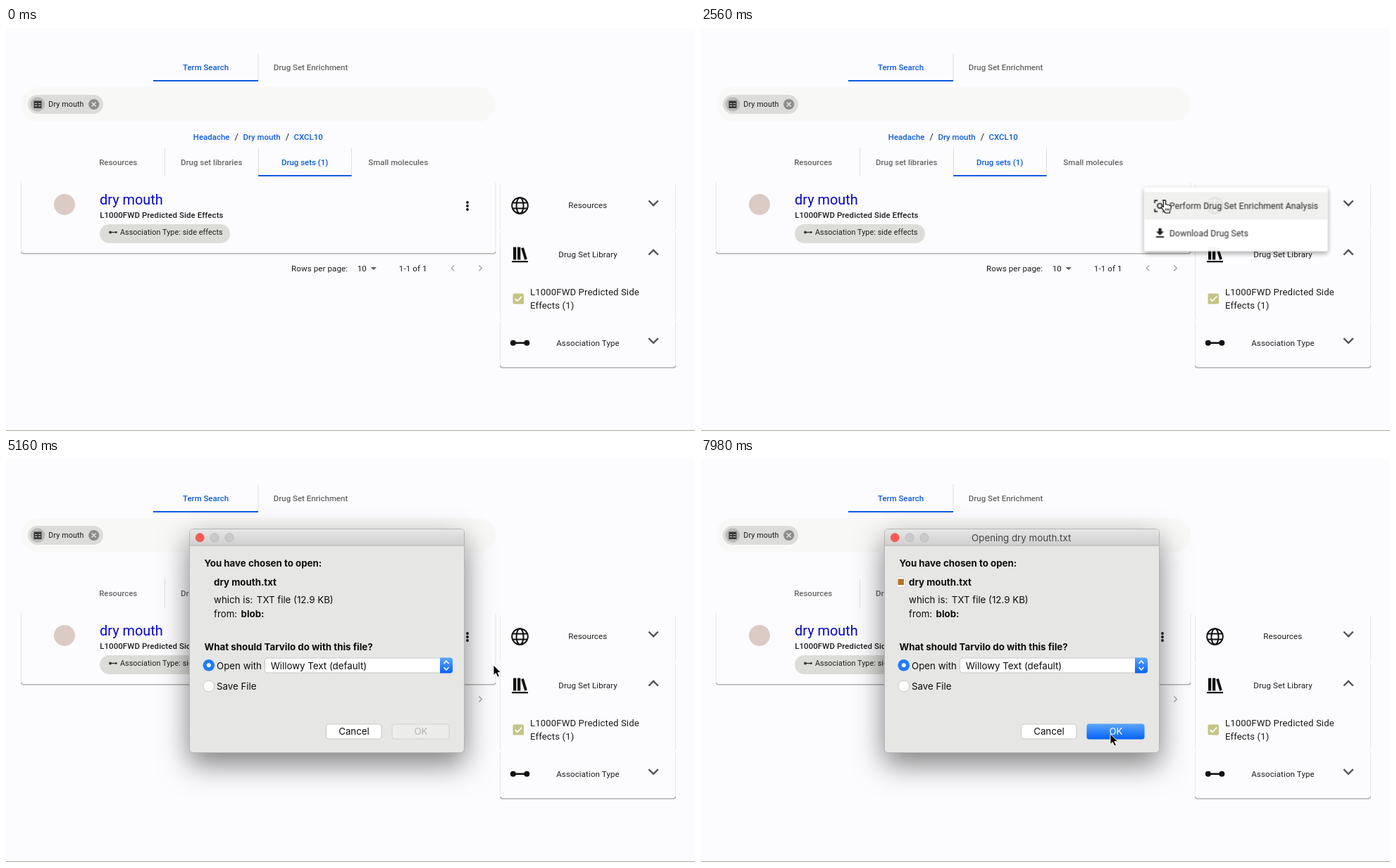
These frames come from a looping animation (978x573 px, 8 s). An HTML page:

```html
<!DOCTYPE html>
<html lang="en">
<head>
<meta charset="utf-8">
<title>Drug set search</title>
<style>
html, body { margin: 0; width: 100%; height: 100%; overflow: hidden; background: #fcfcfe; }
svg { display: block; width: 978px; height: 573px; }
text { font: 400 11.5px Roboto, Arial, sans-serif; letter-spacing: .0107em; fill: #1c1c1c; white-space: pre; }
.mid { text-anchor: middle; }
.tab { font-size: 11.46px; font-weight: 500; letter-spacing: 0; fill: #666; text-anchor: middle; }
.on { fill: #0c5ae0; }
.crumb { font-size: 11.46px; font-weight: 500; letter-spacing: 0; fill: #0c5ae0; }
.title { font-size: 19.9px; letter-spacing: 0; fill: #0505d2; }
.sub { font-size: 11.4px; font-weight: 500; }
.chip { font-size: 10.7px; }
.filter { font-size: 13.17px; letter-spacing: .0094em; }
.item { font-size: 12.36px; letter-spacing: .0094em; }
.line { fill: none; stroke: #111; stroke-width: 2; }
.rule { fill: none; stroke: #dededf; }
.edge { fill: none; stroke: #e7e7ea; }
.base { fill: none; stroke: #b0b0ae; stroke-width: 1.5; }
.chev { fill: none; stroke: #555; stroke-width: 2.4; }

#menu, #dialog, #cursor, .step { animation: 8s linear infinite; }
#menu { transform-origin: 655px 253px; animation-name: menu; }
#paper { fill: #fff; filter: drop-shadow(0 3px 4px rgba(0,0,0,.38)); }
#first { fill: #dededc; animation: first 8s linear infinite; }
#second { fill: #f5f5f4; animation: second 8s step-end infinite; }
@keyframes menu {
  0%, 30% { opacity: 0; transform: scale(.75, .5625); animation-timing-function: cubic-bezier(.4,0,.2,1); }
  32.75%, 52% { opacity: 1; transform: none; animation-timing-function: cubic-bezier(.4,0,.2,1); }
  54.5%, 100% { opacity: 0; transform: scale(.75, .5625); }
}
@keyframes first { 0%, 32% { opacity: .45; } 36%, 100% { opacity: 1; } }
@keyframes second { 0% { opacity: 0; } 43% { opacity: 1; } }

#dialog { transform-origin: 455px 258px; animation-name: dialog; }
#dialog text { font: 400 13.3px Inter, Arial, sans-serif; letter-spacing: 0; fill: #0d0d0d; }
#dialog .bold { font-weight: 700; }
#dialog .head { fill: #444; }
#dialog .off { fill: #b4b4b1; }
#dialog .lit { fill: #fff; }
#frame { filter: drop-shadow(0 16px 20px rgba(0,0,0,.5)); }
.field { fill: #fff; stroke: #c6c6c4; }
@keyframes dialog {
  0%, 62.75% { opacity: 0; transform: scale(.9); animation-timing-function: ease-out; }
  64%, 100% { opacity: 1; transform: none; }
}
#loaded { animation: loaded 8s step-end infinite; }
#ready { animation: ready 8s step-end infinite; }
@keyframes loaded { 0% { opacity: 0; } 65.5% { opacity: 1; } }
@keyframes ready { 0% { opacity: 0; } 77% { opacity: 1; } }

#cursor { animation-name: cursor; animation-timing-function: ease-in-out; }
#arrow { fill: #000; stroke: #fff; stroke-width: .9; animation: arrow 8s step-end infinite; }
#hand { fill: #fff; stroke: #000; animation: hand 8s step-end infinite; }
@keyframes cursor {
  0%, 4% { transform: translate(640px, 582px); }
  12%, 16% { transform: translate(657px, 245px); }
  17%, 37% { transform: translate(658px, 245px); }
  46%, 52.5% { transform: translate(693px, 293px); }
  53%, 70% { transform: translate(692px, 293px); }
  82%, 89% { transform: translate(517px, 392px); }
  96%, 100% { transform: translate(581px, 391px); }
}
@keyframes arrow { 0% { opacity: 1; } 16% { opacity: 0; } 52.5% { opacity: 1; } }
@keyframes hand { 0% { opacity: 0; } 16% { opacity: 1; } 52.5% { opacity: 0; } }
</style>
</head>
<body>
<svg viewBox="0 0 978 573">
  <defs>
    <linearGradient id="bar" x2="0" y2="1"><stop stop-color="#e6e6e7"/><stop offset="1" stop-color="#cfcfd0"/></linearGradient>
    <linearGradient id="blue" x2="0" y2="1"><stop stop-color="#5ba6fb"/><stop offset="1" stop-color="#0562f8"/></linearGradient>
  </defs>
  <rect width="978" height="573" fill="#fcfcfe"/>
  <path d="M0 572.5H978" stroke="#a9a99f"/>

  <!-- Main tabs -->
  <path class="rule" d="M358 36V75"/>
  <path d="M209 75H358" stroke="#0c5ae0" stroke-width="2"/>
  <text class="tab on" x="283.5" y="60">Term Search</text>
  <text class="tab" x="432.5" y="60">Drug Set Enrichment</text>

  <!-- Search box -->
  <rect x="22" y="84" width="673" height="49" rx="24" fill="#f8f8f7"/>
  <rect x="31" y="95" width="107" height="27" rx="13.5" fill="#dcdcda"/>
  <circle cx="45" cy="108.5" r="10.3" fill="#b9b9b7"/>
  <path d="M39.5 103.5h11v10.5h-11z" fill="#383838"/>
  <path d="M41 107.5h3.3m1.6 0h3.3M41 110.7h3.3m1.6 0h3.3" stroke="#c2c2c0" stroke-width="1.2"/>
  <text class="chip" x="60.3" y="112">Dry mouth</text>
  <circle cx="124.7" cy="108.5" r="7.6" fill="#8d8d8b"/>
  <path d="M121.7 105.5l6 6m0-6l-6 6" stroke="#e4e4e2" stroke-width="1.5"/>

  <!-- Breadcrumbs -->
  <text class="crumb" x="265.8" y="159">Headache</text>
  <text x="324.5" y="159" style="font-size:13px">/</text>
  <text class="crumb" x="336.5" y="159">Dry mouth</text>
  <text x="396.8" y="159" style="font-size:13px">/</text>
  <text class="crumb" x="408.5" y="159">CXCL10</text>

  <!-- Result tabs -->
  <path class="rule" d="M225.5 171V211M358.5 171V211M490.5 171V211"/>
  <path d="M358 210H490.5" stroke="#0c5ae0" stroke-width="2"/>
  <text class="tab" x="159.2" y="195">Resources</text>
  <text class="tab" x="291.7" y="195">Drug set libraries</text>
  <text class="tab on" x="424.2" y="195">Drug sets (1)</text>
  <text class="tab" x="556.7" y="195">Small molecules</text>

  <!-- Result card -->
  <path class="edge" d="M21.5 219V318M695 219V318"/>
  <path class="base" d="M21.8 318q0 2.7 3 2.7H691.7q3 0 3-2.7"/>
  <circle cx="83" cy="251" r="15" fill="#dccbc4"/>
  <text class="title" x="133" y="250.5">dry mouth</text>
  <text class="sub" x="133.2" y="270">L1000FWD Predicted Side Effects</text>
  <rect x="133" y="279" width="185" height="27" rx="13.5" fill="#dcdcd9"/>
  <path d="M147 290.5H157" stroke="#333" stroke-width="1.4"/>
  <circle cx="148" cy="290.5" r="1.9" fill="#333"/><circle cx="156.3" cy="290.5" r="1.4" fill="#333"/>
  <text class="chip" x="162" y="294">Association Type: side effects</text>
  <g fill="#111"><circle cx="655" cy="248" r="1.9"/><circle cx="655" cy="253" r="1.9"/><circle cx="655" cy="258" r="1.9"/></g>

  <!-- Pagination -->
  <text x="405" y="346">Rows per page:</text>
  <text x="498.7" y="346">10</text>
  <path d="M517.5 340h8.5l-4.2 4.3z" fill="#666"/>
  <text x="557.8" y="346">1-1 of 1</text>
  <path d="M636.3 337.5l-4 4 4 4M671.3 337.5l4 4-4 4" fill="none" stroke="#a6a6a6" stroke-width="1.5"/>

  <!-- Filters -->
  <path class="edge" d="M701.5 222V286q0 2 2 2M950.5 222V286q0 2-2 2M701.5 291V412q0 2 2 2M950.5 291V412q0 2-2 2M701.5 417V480M950.5 417V480"/>
  <path class="base" d="M701.8 480q0 2.9 3 2.9H947.3q3 0 3-2.9"/>
  <g class="line">
    <circle cx="729.5" cy="252.5" r="11.3"/>
    <ellipse cx="729.5" cy="252.5" rx="5" ry="11.3"/>
    <path d="M719 248.5h21M719 256.5h21"/>
  </g>
  <text class="mid" x="825.8" y="256.3">Resources</text>
  <path d="M720 311.5h4.3v18H720zM726 311.5h4.3v18H726zM731.2 313.2l3.6-1.2 5 16.5-3.6 1.2zM718 331h23v2.3h-23z" fill="#111"/>
  <text class="mid" x="826" y="326.3">Drug Set Library</text>
  <rect x="719.5" y="377.5" width="15.5" height="15" rx="2" fill="#c3c586"/>
  <path d="M722.5 385l3.3 3.3 6.4-6.6" fill="none" stroke="#fff" stroke-width="1.8"/>
  <text class="filter" x="744" y="379.5">L1000FWD Predicted Side</text>
  <text class="filter" x="744" y="399">Effects (1)</text>
  <path class="line" style="stroke-width:2.6" d="M720 447.8H739"/>
  <circle cx="719.8" cy="447.8" r="4" fill="#111"/><circle cx="739.3" cy="447.8" r="4" fill="#111"/>
  <text class="mid" x="826" y="452">Association Type</text>
  <path class="chev" d="M912.3 245.5l6.7 6.7 6.7-6.7M912.3 322.5l6.7-6.7 6.7 6.7M912.3 441.2l6.7 6.7 6.7-6.7"/>

  <g id="menu">
    <rect id="paper" x="628.5" y="226" width="264" height="93" rx="3"/>
    <rect id="first" x="628.5" y="233" width="264" height="39.5"/>
    <rect id="second" x="628.5" y="272.5" width="264" height="39.5"/>
    <path class="line" style="stroke-width:1.7" d="M644 249v-4h4M655 245h4v4M659 257v4h-4M648 261h-4v-4M653.5 255.3l3.8 3.8"/>
    <circle class="line" style="stroke-width:1.7" cx="651.2" cy="252.8" r="3.4"/>
    <text class="item" x="665" y="257.5">Perform Drug Set Enrichment Analysis</text>
    <path d="M649.3 285.5h4.4v4.6h3.4l-5.6 5.6-5.6-5.6h3.4zM645.8 297h11.4v1.9h-11.4z" fill="#111"/>
    <text class="item" x="665" y="296.7">Download Drug Sets</text>
  </g>

  <g id="dialog">
    <rect id="frame" x="260.5" y="99.5" width="390" height="318" rx="5" fill="#e6e6e4" stroke="#b5b5b4"/>
    <path d="M261 123V104.500q0-4.500 4.500-4.500H645.500q4.500 0 4.500 4.500V123z" fill="url(#bar)"/>
    <path d="M261 123H650" stroke="#b2b2b2"/>
    <circle cx="275.200" cy="111.700" r="6" fill="#fb5a54" stroke="#df4a44" stroke-width=".7"/>
    <g fill="#cacaca" stroke="#b3b3b3" stroke-width=".8"><circle cx="296" cy="111.700" r="6"/><circle cx="317" cy="111.700" r="6"/></g>

    <text class="bold" x="281.5" y="152.500">You have chosen to open:</text>
    <text class="bold" x="295" y="180">dry mouth.txt</text>
    <text x="295" y="205">which is:</text>
    <text x="355.800" y="205">TXT file (12.9 KB)</text>
    <text x="295" y="224.500">from:</text>
    <text class="bold" x="333.500" y="224.500">blob:</text>
    <text class="bold" x="281.500" y="271.500">What should Tarvilo do with this file?</text>

    <circle cx="287.800" cy="293.300" r="8.300" fill="#1f7cf7"/>
    <circle cx="287.800" cy="293.300" r="3" fill="#fff"/>
    <text x="299" y="298.500">Open with</text>
    <rect class="field" x="367.500" y="283" width="266" height="21" rx="3.500"/>
    <text x="375.700" y="298.500">Willowy Text (default)</text>
    <path d="M616 282.500h14q4 0 4 4v14q0 4-4 4h-14z" fill="url(#blue)"/>
    <path d="M621.500 291l3.500-4 3.500 4M621.500 296l3.500 4 3.500-4" fill="none" stroke="#fff" stroke-width="1.600"/>
    <circle class="field" cx="287.800" cy="323" r="8"/>
    <text x="299" y="328">Save File</text>

    <rect class="field" x="454.500" y="377" width="78.500" height="21" rx="3.500"/>
    <text class="mid" x="494" y="392.400">Cancel</text>
    <rect x="548" y="377" width="81" height="21" rx="3.500" fill="#ececea" stroke="#d0d0ce"/>
    <text class="mid off" x="589" y="392.400">OK</text>

    <g id="loaded">
      <text class="mid head" x="454.700" y="116.800">Opening dry mouth.txt</text>
      <path d="M278 167.500h8l3.500 3.500v11.500H278z" fill="#fff" stroke="#c9c9c7" stroke-width=".7"/>
      <rect x="279.500" y="170.500" width="8.500" height="8.500" fill="#b77224"/>
    </g>
    <g id="ready">
      <rect x="547.500" y="376.500" width="82" height="22" rx="3.500" fill="url(#blue)"/>
      <text class="mid lit" x="589" y="392.400">OK</text>
    </g>
  </g>

  <g id="cursor">
    <path id="arrow" d="M0 0V14.500L3.300 11.500 5.800 17 8.300 16 5.900 10.600H10.400Z"/>
    <path id="hand" d="M-1.600 10V1.400Q-1.600 0 0 0T1.600 1.400V6.300Q2 5.300 3.200 5.500T4.400 7Q5 6 6.100 6.400T7 7.800Q8 7 8.800 7.800T9 11Q9 14 7.500 15.500V18H.5V16.500L-3.800 11Q-5 9-3.600 8.600T-1.600 10ZM1.800 11.500v3M4 11.500v3M6.200 11.500v3"/>
  </g>
</svg>
</body>
</html>
```
